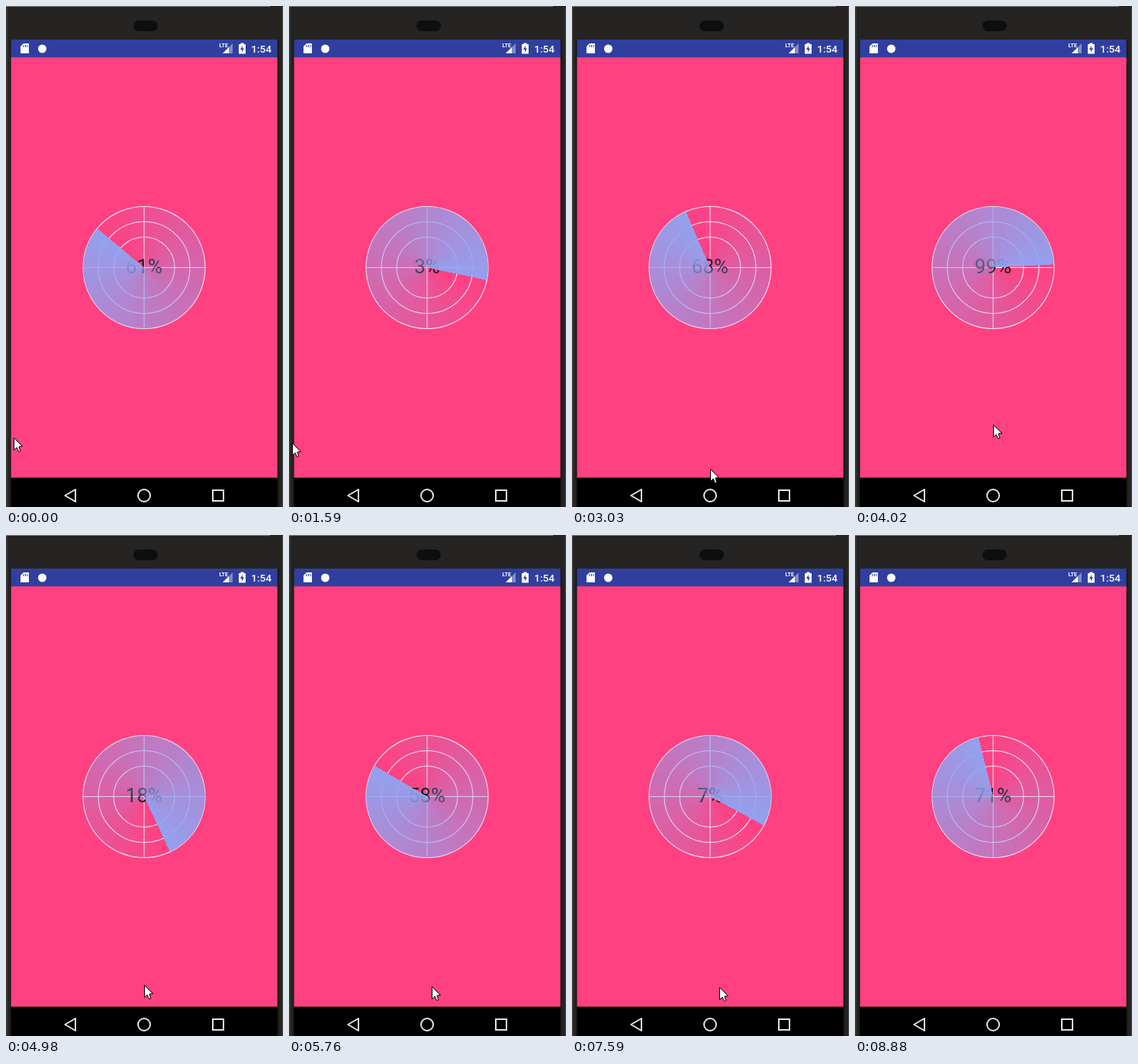
An HTML page with a canvas for the animation above (8980 ms loop, 363 by 656 pixels).

```html
<!DOCTYPE html>
<html lang="en">
<head>
<meta charset="utf-8">
<title>Radar progress</title>
<style>
html, body { margin: 0; width: 100%; height: 100%; overflow: hidden; background: #252422; }
canvas { display: block; width: 363px; height: 656px; }
</style>
</head>
<body>
<canvas id="stage" width="363" height="656"></canvas>
<script>
const ctx = document.getElementById('stage').getContext('2d');
const LOOP = 8980, STEP = 130.6, TAU = Math.PI * 2;
const CX = 181, CY = 342.5, R = 80;
const SCREEN = { x: 6.6, w: 349, top: 44, body: 67.3, nav: 617.6 };

// Each turn eases in and out, then rests briefly until the next start
const TURN = 2850, STARTS = [-1613, 1250, 4182, 7075];

// Pointer path: [ms, x, y]
const POINTER = [
  [0, 10, 565], [500, 0, 566], [1580, 4, 572], [2400, 4, 572], [3019, 181, 606],
  [3260, 181, 548], [4330, 181, 548], [4440, 181, 589], [5400, 181, 589],
  [6100, 193, 593], [7590, 193, 592], [8100, 193, 610]
];
const POINTER_END = 8300;

const refreshTime = t => Math.floor((t + 20) / STEP) * STEP + 15;
const mix = (a, b, f) => Math.round(a + (b - a) * f);

function progress(t) {
  const start = STARTS.findLast(s => s <= t);
  const x = Math.min(1, (t - start) / TURN);
  return 0.5 - Math.cos(Math.PI * x) / 2;
}

function rect(color, x, y, w, h) {
  ctx.fillStyle = color;
  ctx.fillRect(x, y, w, h);
}

function paint(fill, stroke, width) {
  if (fill) {
    ctx.fillStyle = fill;
    ctx.fill();
  }
  if (stroke) {
    ctx.strokeStyle = stroke;
    ctx.lineWidth = width;
    ctx.stroke();
  }
}

function shape(points, fill, stroke, width) {
  ctx.beginPath();
  points.forEach(([x, y]) => ctx.lineTo(x, y));
  ctx.closePath();
  paint(fill, stroke, width);
}

function circle(x, y, r, fill, stroke, width) {
  ctx.beginPath();
  ctx.arc(x, y, r, 0, TAU);
  paint(fill, stroke, width);
}

function label(text, x, y, font, color, align) {
  ctx.font = font + ' Roboto, sans-serif';
  ctx.fillStyle = color;
  ctx.textAlign = align;
  ctx.fillText(text, x, y);
}

function drawPhone() {
  const { x, w, top, body, nav } = SCREEN;
  rect('#252422', 0, 0, 363, 656);
  rect('#7c7c7a', 0, 0, 346, 1);
  rect('#363634', 0, 1, 2, 655);
  rect('#1b1b1a', 5, top, 353, 612);
  rect('#4a4a48', 362, 1, 1, 655);
  ctx.beginPath();
  ctx.roundRect(167, 19, 32, 14, 7);
  paint('#0e0e0e');
  rect('#303f9f', x, top, w, 24);
  rect('#ff4081', x, body, w, nav - body + 1);
  rect('#000', x, nav, w, 40);
}

function drawStatus() {
  const white = '#fff', bar = '#303f9f';
  // Memory card
  shape([[19, 53], [23, 49], [30, 49], [30, 62], [19, 62]], white);
  for (let x = 22.5; x < 28; x += 2.5) rect(bar, x, 51, 1, 3);
  circle(47.5, 56, 5.5, white);
  // Signal
  label('LTE', 279.5, 54, 'bold 7px', white, 'left');
  shape([[297, 49], [297, 62], [284, 62]], 'rgba(255,255,255,.4)');
  shape([[292, 54], [292, 62], [284, 62]], white);
  // Battery
  rect(white, 305, 50, 9, 12.5);
  rect(white, 307.5, 48.5, 4, 2);
  shape([[310, 52], [307, 57], [309, 57], [309, 60.5], [312, 55.5], [310, 55.5]], bar);
  label('1:54', 348, 61, '500 13.6px', white, 'right');
}

function drawNav() {
  const c = '#e2e2e2', y = 641;
  ctx.lineJoin = 'round';
  shape([[77.3, y], [91, y - 8], [91, y + 8]], null, c, 2);
  circle(CX, y, 8, null, c, 2);
  ctx.lineJoin = 'miter';
  ctx.strokeRect(271, y - 7, 14, 14);
}

function drawRadar(p) {
  const line = 'rgba(255,255,255,.9)';
  for (let r = R; r >= R / 2; r -= R / 4) circle(CX, CY, r, null, line, 1.1);
  rect(line, CX - R, CY - 0.5, 2 * R, 1);
  rect(line, CX - 0.5, CY - R, 1, 2 * R);
  label(Math.floor(p * 100) + '%', CX, 350, '26px', '#0c0c0c', 'center');

  const sweep = ctx.createConicGradient(p * TAU, CX, CY);
  sweep.addColorStop(0, 'rgba(143,164,242,0)');
  sweep.addColorStop(1, 'rgba(143,164,242,.96)');
  circle(CX, CY, R, sweep);
}

function drawPointer(t) {
  if (t >= POINTER_END) return;
  const i = POINTER.findLastIndex(q => q[0] <= t);
  const [t0, x0, y0] = POINTER[i];
  const [t1, x1, y1] = POINTER[i + 1] || [POINTER_END, x0, y0];
  const f = (t - t0) / (t1 - t0);
  ctx.save();
  ctx.translate(mix(x0, x1, f) + 0.5, mix(y0, y1, f) + 0.5);
  shape([[0, 0], [0, 16], [3.6, 12.6], [6, 18], [8.3, 17.3], [6.4, 11.5], [11, 11]],
        '#fff', '#000', 1);
  ctx.restore();
}

function draw(now) {
  const t = refreshTime(Math.max(0, now - begin) % LOOP);
  drawPhone();
  drawStatus();
  drawNav();
  drawRadar(progress(t));
  drawPointer(t);
  requestAnimationFrame(draw);
}

const begin = performance.now();
draw(begin);
</script>
</body>
</html>
```
